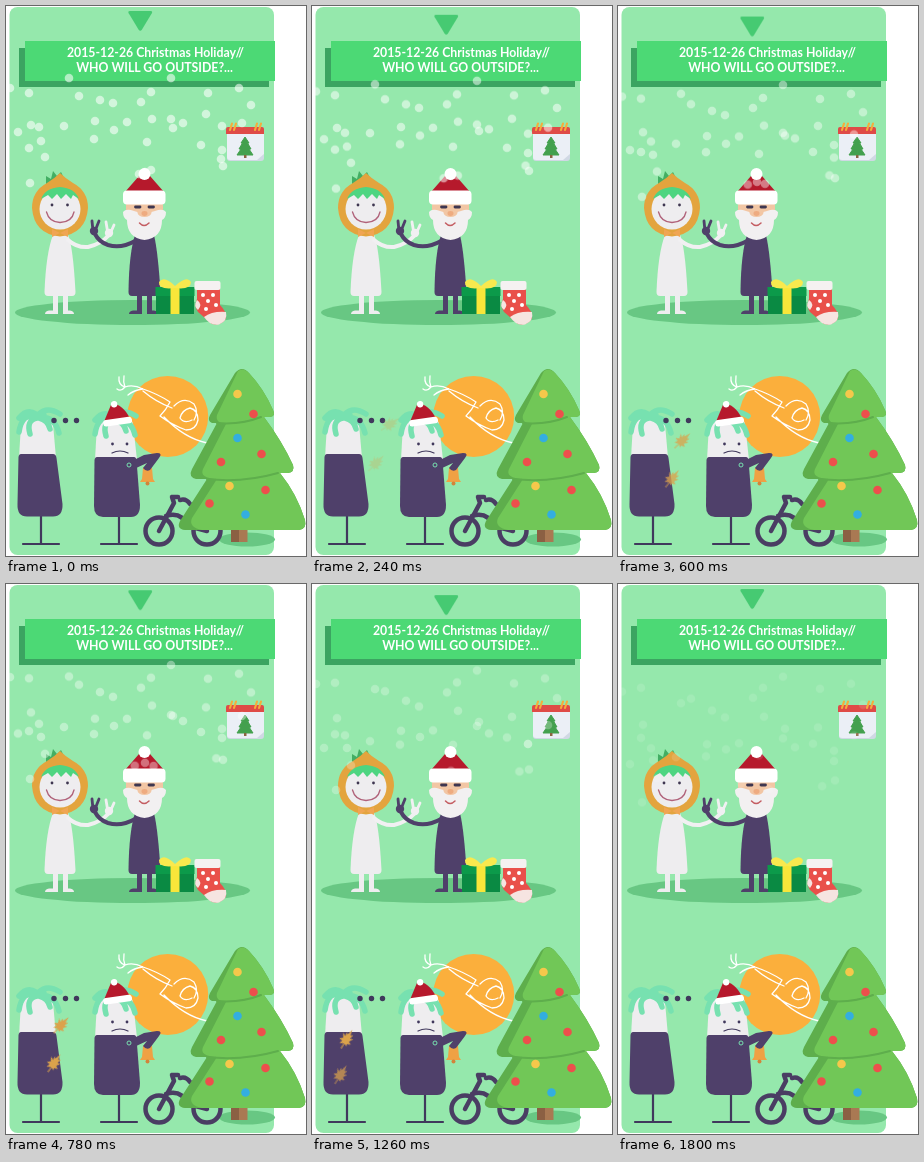
These frames come from a looping animation (300 by 550 pixels, 1830 ms). An HTML page:

```html
<!DOCTYPE html>
<html lang="en">
<head>
<meta charset="utf-8">
<title>Christmas Holiday</title>
<style>
  html, body { margin: 0; width: 100%; height: 100%; overflow: hidden; background: #fff; }
  svg { display: block; width: 300px; height: 550px; }
  text { font: 700 12.3px Lato, "Open Sans", sans-serif; fill: #fff; text-anchor: middle; }
  .line { fill: none; stroke-linecap: round; stroke-linejoin: round; }
  .white { fill: #eeedef; }
  .plum { fill: #4f406a; }
  .arrow { animation: bob 457.5ms ease-in-out infinite alternate; }
  .flake { fill: #fff; animation: fall 1830ms linear infinite; }
  .leaf { fill: #dba24b; animation: 1830ms linear infinite; }
  .leaf.a { animation-name: driftA; }
  .leaf.b { animation-name: driftB; }
  @keyframes bob { to { transform: translateY(7px); } }
  @keyframes fall {
    from { opacity: .58; }
    to { opacity: .12; transform: translate(var(--dx), var(--dy)); }
  }
  @keyframes driftA {
    0% { transform: translate(85px, 407px) rotate(62deg); opacity: 0; }
    13.1% { transform: translate(78px, 418px) rotate(55deg); opacity: .28; }
    24.6% { transform: translate(72px, 429px) rotate(48deg); opacity: .58; }
    42.6% { transform: translate(55px, 441px) rotate(42deg); opacity: 1; }
    55.7% { transform: translate(43px, 450px) rotate(36deg); opacity: 1; }
    82% { transform: translate(26px, 460px) rotate(24deg); opacity: 1; }
    98.4%, 100% { transform: translate(18px, 468px) rotate(15deg); opacity: 0; }
  }
  @keyframes driftB {
    0% { transform: translate(70px, 446px) rotate(48deg); opacity: 0; }
    13.1% { transform: translate(64px, 457px) rotate(43deg); opacity: .28; }
    24.6% { transform: translate(59px, 467px) rotate(38deg); opacity: .6; }
    42.6% { transform: translate(48px, 479px) rotate(34deg); opacity: 1; }
    55.7% { transform: translate(38px, 484px) rotate(32deg); opacity: 1; }
    82% { transform: translate(19px, 497px) rotate(30deg); opacity: .45; }
    98.4%, 100% { transform: translate(14px, 506px) rotate(28deg); opacity: 0; }
  }
</style>
</head>
<body>
<svg viewBox="0 0 300 550">
  <defs>
    <path id="leaf" d="M-.5 11L-.3 5L-4 7L-3 3.500L-6.500 3L-3.500 .5L-6 -4L-2.500 -2L-3 -6L-1.200 -4.500L.5 -11L1.800 -5L4 -6.500L3 -2L6 -3L3.500 1L6.500 3L3 4L3.500 6.500L.7 5L.5 11Z"/>
    <path id="legs" d="M-6 0V15.500H-10Q-14 16 -14 19H-1V0ZM4 0V19H15Q15 16 11 15.500H9V0Z"/>
    <path id="stool" class="line" stroke="#40385c" stroke-width="2.2" d="M0 0V28M-18 28H18"/>
    <path id="hair" class="line" stroke="#77e1b0" stroke-width="5.5" d="M-2 0Q-17 -5 -20 15M-2 1Q-13 3 -9 17M-3 -3Q-12 -9 -20 1M0 -3Q8 -11 21 -3M2 0Q16 0 20 16M0 1Q9 3 11 12M-5 -2H5"/>
  </defs>

  <rect x="3.500" y="1" width="264.500" height="548" rx="8" fill="#95e8ac"/>
  <path class="arrow" d="M124 5H144.500Q147 5 145.800 7.200L136 23.500Q134.300 26 132.500 23.500L122.700 7.200Q121.500 5 124 5Z" fill="#46ca72"/>
  <path d="M13 42H263V81H13Z" fill="#3ba461"/>
  <path d="M19 35H269V75H19Z" fill="#4cd975"/>
  <text x="149.500" y="50.500">2015-12-26 Christmas Holiday//</text>
  <text x="148.500" y="66">WHO WILL GO OUTSIDE?...</text>

  <!-- calendar -->
  <g>
    <path d="M221 127H258V152Q258 155 255 155H224Q221 155 221 152Z" fill="#d0d8e4"/>
    <path d="M221 127H258V148L251 154H224Q221 154 221 151Z" fill="#ebeff6"/>
    <path d="M220 128V123Q220 121 222 121H256Q258 121 258 123V128Z" fill="#df4b47"/>
    <path class="line" stroke="#f5ad3c" stroke-width="2.100" d="M224 124L226 117.500M228 124L230 117.500M249 124L251 117.500M253 124L255 117.500"/>
    <path d="M239 131L243 137H241.500L245 143H243L247 149H231L235 143H233L236.500 137H235Z" fill="#43a04e" stroke="#43a04e" stroke-linejoin="round"/>
    <path d="M238 149h2.500v3H238Z" fill="#8b6541"/>
  </g>

  <ellipse cx="126.500" cy="306.500" rx="117.500" ry="12.500" fill="#68c783"/>

  <!-- hooded friend -->
  <g>
    <use href="#legs" x="53" y="289" class="white"/>
    <path class="white" d="M47 229H62Q67 240 69.500 286Q69.500 290 66 290H42Q38.500 290 38.500 286Q40 247 47 229Z"/>
    <path class="line" stroke="#f1f0f2" stroke-width="4" d="M62 234Q71 242 82 241Q95 238 102 230"/>
    <path class="line" stroke="#f1f0f2" stroke-width="2.800" d="M102 228L100 216M104 228L108 219"/>
    <circle cx="103" cy="227" r="4.200" fill="#f1f0f2"/>
    <path d="M40 179L40 170L45 173L47 165L51 170L55 166L58 172Z" fill="#43ae63"/>
    <path d="M54 167Q59 172 67 177Q82 185 82 202Q80 228 54 230.500Q28 228 26 202Q26 185 41 177Q49 172 54 167Z" fill="#e3a43e"/>
    <circle class="white" cx="54" cy="203" r="20.500"/>
    <path d="M35 193Q39 182 54 181Q69 182 73 193L67 189L65 193L60 188L55 193L51 188L46 193L42 189Z" fill="#4ed581"/>
    <g fill="#3e3650"><circle cx="46" cy="199" r="1.400"/><circle cx="61.500" cy="199" r="1.400"/></g>
    <path class="line" stroke="#b0627a" stroke-width="1.300" d="M40.500 206Q43 216 54 216.500Q66 216 68 206"/>
    <path d="M54 227L46 223V231ZM54 227L62 223V231Z" fill="#f0a553"/>
  </g>

  <!-- bearded friend -->
  <g>
    <use href="#legs" x="137" y="289" class="plum"/>
    <path class="plum" d="M129 229H148Q152 246 154.500 286Q154.500 290 151 290H126Q122.500 290 122.500 286Q123 247 129 229Z"/>
    <path class="line" stroke="#4f406a" stroke-width="4" d="M129 235Q115 243 102 239Q93 236 89 228"/>
    <path class="line" stroke="#4f406a" stroke-width="2.800" d="M87 225L86 215M89 225L93 215"/>
    <circle cx="88" cy="225" r="4.200" class="plum"/>
    <rect x="120" y="194" width="37" height="16" rx="5" fill="#f2c6a4"/>
    <path d="M117 206Q120 202 128 205Q138 209 149 205Q157 202 160 206Q160 212 156 214Q156 232 138.500 234Q121 232 121 214Q117 212 117 206Z" fill="#f2f0f1"/>
    <ellipse cx="138.500" cy="206.500" rx="7" ry="4.500" fill="#f2c6a4"/>
    <ellipse cx="138.500" cy="207.500" rx="3" ry="2.400" fill="#eeab80"/>
    <path class="line" stroke="#3e3650" stroke-width="2.800" d="M129.500 201H134M143 201H147.500"/>
    <path class="line" stroke="#c45d62" stroke-width="1.500" d="M133.500 217Q138 222 143 217"/>
    <path d="M119 186L133 170H144L158 186Z" fill="#b6192c"/>
    <circle cx="138.500" cy="168" r="6" fill="#fff"/>
    <rect x="117" y="184.500" width="42.500" height="14" rx="4" fill="#fff"/>
  </g>

  <!-- gift and stocking -->
  <g>
    <path d="M150 282H188V308H150Z" fill="#0a8a43"/>
    <path d="M149.500 281H188.500V290H149.500Z" fill="#0c9a4a"/>
    <path d="M164.500 281H173.500V308H164.500Z" fill="#f8e63a"/>
    <path d="M169 282Q152 284 153 276Q158 269 169 280Q181 269 185 276Q185 284 169 282Z" fill="#f8e94e"/>
    <path d="M191 283H214V299Q221 306 220 312Q216 320 206 318L192 306Q188 300 191 293Z" fill="#e9504a"/>
    <path d="M198 311Q206 305 220 306Q222 315 213 318.500Q204 320 198 311Z" fill="#f6e4e1"/>
    <path d="M191 294Q197 298 192 304Q187 300 191 294Z" fill="#f6e4e1"/>
    <rect x="188.500" y="275" width="26" height="9" rx="2" fill="#f5f1f1"/>
    <g fill="#fff"><circle cx="197" cy="289" r="2"/><circle cx="207" cy="289" r="2"/><circle cx="202" cy="295" r="2"/><circle cx="210" cy="299" r="2"/><circle cx="200" cy="303" r="2"/></g>
  </g>

  <!-- moon with sleigh -->
  <circle cx="161.700" cy="410.500" r="40.500" fill="#fbaf3c"/>
  <path class="line" stroke="#fff" stroke-width="1.300" d="M113 371Q112 379 119 381Q115 386 111 383M118 370Q117 376 119 381Q127 378 137 383Q128 384 122 389M137 383Q152 388 164 396Q160 404 154 410Q166 419 180 424Q190 424 192 414Q192 404 184 402Q176 404 174 412Q178 418 186 414M168 400Q178 390 188 398Q193 406 188 414M158 411Q178 432 201 437M137 385Q150 396 166 402"/>

  <!-- bicycle -->
  <ellipse cx="241" cy="533.500" rx="28" ry="7" fill="#68c783"/>
  <g class="line" stroke="#4a3d63" stroke-width="4.500">
    <circle cx="153" cy="525" r="13.500"/><circle cx="201" cy="525" r="13.500"/>
    <path d="M153 525L168 497L166 491H172M160 510Q175 505 182 520L201 525"/>
    <path d="M174 494Q180 492 184 498"/>
  </g>

  <!-- tree -->
  <g>
    <path d="M225 521H233V536H225Z" fill="#8b6043"/>
    <path d="M233 521H241.500V536H233Z" fill="#a97953"/>
    <path d="M229 367Q236 359 243 367Q258 383 267 404Q270 410 264 411H258Q276 435 287 459Q289 466 282 467H274Q291 488 299 514Q301 523 293 524H179Q170 523 174 515L201 473H190Q182 471 186 463L211 417H206Q201 415 204 409Z" fill="#5eae4c"/>
    <path d="M232 365Q237 361 243 367Q258 383 267 404Q270 410 264 411H258Q276 435 287 459Q289 466 282 467H274Q291 488 299 514Q301 523 293 524H196Q182 521 186 512L211 473Q193 472 197 463L220 418Q209 417 211 409Z" fill="#71c757"/>
    <path class="line" stroke="#5eae4c" stroke-width="2" d="M211 417Q235 419 255 411M201 473Q237 477 272 467"/>
    <g fill="#f5c84b"><circle cx="231.500" cy="388" r="4.300"/><circle cx="223.500" cy="480" r="4.300"/></g>
    <g fill="#ed4f4c"><circle cx="247.500" cy="408" r="4.300"/><circle cx="215" cy="456" r="4.300"/><circle cx="255.500" cy="448" r="4.300"/><circle cx="203.500" cy="497.500" r="4.300"/><circle cx="259.500" cy="484" r="4.300"/></g>
    <g fill="#33aee0"><circle cx="231.500" cy="432" r="4.300"/><circle cx="239.500" cy="508.500" r="4.300"/></g>
  </g>

  <!-- waiting pair -->
  <g>
    <use href="#stool" x="35" y="510"/>
    <path class="white" d="M15 418Q16 413 21 413H41Q46 413 47 418L50 452H13Z"/>
    <path class="plum" d="M15 448H47Q50 448 50.500 452L56.500 498Q57 510.500 47 510.500H21Q11 510.500 11.500 498L12.500 451Q13 448 15 448Z"/>
    <use href="#hair" x="33" y="411"/>
    <g fill="#40385c"><circle cx="48" cy="414.500" r="2.700"/><circle cx="59.500" cy="414.500" r="2.700"/><circle cx="70.500" cy="414.500" r="2.700"/></g>
  </g>
  <g>
    <use href="#stool" x="113" y="510"/>
    <path class="white" d="M91 418Q92 413 97 413H121Q126 413 127 418L131 454H89Z"/>
    <path class="plum" d="M91 451H128Q130 451 130.500 454L134 499Q134 511 125 511H97Q88 511 88 500L88.500 454Q89 451 91 451Z"/>
    <use href="#hair" x="109" y="413"/>
    <g transform="rotate(-8 111 415)">
      <path d="M98 414L108 397Q119 399 124 414Z" fill="#b6192c"/>
      <circle cx="110.500" cy="398" r="3.200" fill="#fff"/>
      <rect x="97" y="412.500" width="29" height="6.500" rx="3" fill="#fff"/>
    </g>
    <path class="line" stroke="#40385c" stroke-width="1.200" d="M106 447Q114 443 122 447"/>
    <g fill="#40385c"><circle cx="106.500" cy="438" r="1.400"/><circle cx="121" cy="438" r="1.400"/></g>
    <path class="line" stroke="#d98c3f" stroke-width="2" d="M141.500 459V463"/>
    <path d="M137 462Q141.500 458 146 462L147 473L149 476H134L136 473Z" fill="#efa144"/>
    <circle cx="141.500" cy="477.500" r="2" fill="#d1843a"/>
    <path class="plum" d="M124 456L138 449L151 447Q157 447 153 452L144 464Q140 466 137 462L141 457L128 463Z"/>
    <circle cx="123" cy="459" r="2" fill="#4f406a" stroke="#77e1b0"/>
  </g>

  <use href="#leaf" class="leaf a"/>
  <use href="#leaf" class="leaf b"/>
  <g id="snow"></g>
</svg>
<script>
  // x, y, fall distance, optional sideways drift
  const flakes = [
    [63, 72, 48], [165, 72, 21], [4, 82, 26], [23, 87, 17], [73, 90, 25],
    [94, 94, 33], [107, 97, 37], [135, 96, 18], [145, 86, 18], [202, 87, 18],
    [233, 82, 18], [245, 99, 22], [200, 108, 36], [216, 120, 58], [236, 117, 35],
    [12, 126, 55], [25, 119, 22], [33, 121, 44], [35, 135, 42], [23, 142, 12],
    [39, 151, 44], [24, 177, 42], [58, 120, 54], [89, 115, 46], [88, 133, 40],
    [108, 124, 42], [121, 116, 44], [141, 136, 36], [146, 113, 20], [165, 113, 42],
    [167, 122, 23], [177, 117, 47], [195, 139, 21], [216, 144, 23],
    [215, 153, 50, -11], [217, 160, 37], [133, 168, 32, -10], [139, 166, 30],
    [145, 164, 42, 6]
  ];
  const snow = document.getElementById("snow");
  for (const [x, y, dy, dx = 0] of flakes) {
    const dot = document.createElementNS(snow.namespaceURI, "circle");
    dot.setAttribute("class", "flake");
    dot.setAttribute("cx", x);
    dot.setAttribute("cy", y);
    dot.setAttribute("r", 4.3);
    dot.style.setProperty("--dx", dx + "px");
    dot.style.setProperty("--dy", dy + "px");
    snow.append(dot);
  }
</script>
</body>
</html>
```
